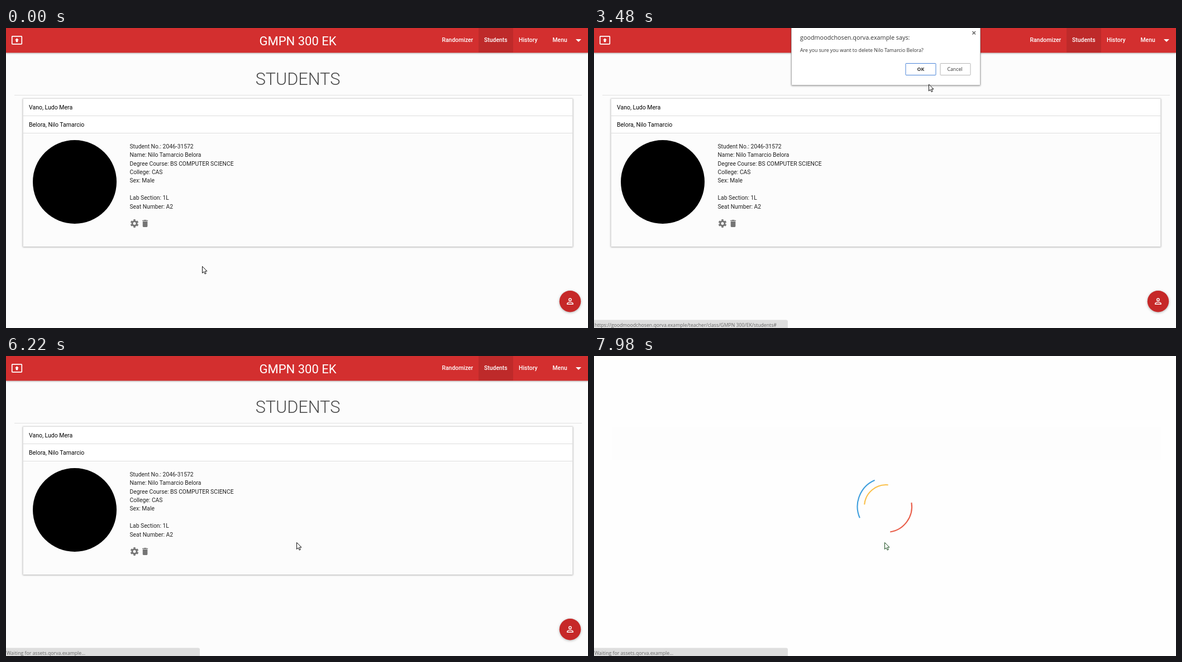
Write an HTML page that moves like this. It is 1042 by 538 pixels and loops after 8000 ms.

```html
<!DOCTYPE html>
<html lang="en">
<head>
<meta charset="utf-8">
<title>Students</title>
<style>
  html, body { margin: 0; width: 100%; height: 100%; overflow: hidden; background: #fcfcfc; }
  svg { display: block; }
  text { font-family: Roboto, sans-serif; white-space: pre; }
  .mid { text-anchor: middle; }
  .nav text { font-size: 10.4px; font-weight: 500; fill: #fff; }
  .row { font-size: 10.5px; fill: #000; }
  #info text { font-size: 10.32px; fill: #222; }
  .ui text { font-family: "Open Sans", sans-serif; font-size: 8.8px; fill: #333; }
  #card { filter: drop-shadow(0 1.2px 1.5px rgba(0,0,0,.32)); }
  #fab { filter: drop-shadow(0 1.5px 2px rgba(0,0,0,.3)); }
  #bar { filter: drop-shadow(0 1.2px 1.5px rgba(0,0,0,.3)); }
  #dialog { filter: drop-shadow(0 1px 1.5px rgba(0,0,0,.35)); transform-origin: 522.5px 51px; }
</style>
</head>
<body>
<svg width="1042" height="538" viewBox="0 0 1042 538">
  <g id="page">
    <rect width="1042" height="538" fill="#fcfcfc"/>
    <rect id="bar" width="1042" height="44.4" fill="#d32f2f"/>
    <g class="nav">
      <rect x="846" width="62" height="44" fill="#be2a2a"/>
      <path transform="translate(9 11.3) scale(.875)" fill="#fff" d="M21 3H3c-1.1 0-2 .9-2 2v14c0 1.1.9 2 2 2h18c1.1 0 2-.9 2-2V5c0-1.1-.9-2-2-2zm0 16H3V5h18zM10 12H8l4-4 4 4h-2v4h-4z"/>
      <text class="mid" x="522.5" y="31" style="font-size:22px;font-weight:400">GMPN 300 EK</text>
      <text x="780.5" y="25">Randomizer</text>
      <text x="856" y="25">Students</text>
      <text x="918" y="25">History</text>
      <text x="978.5" y="25">Menu</text>
      <path d="M1020 20h10l-5 5z" fill="#fff"/>
    </g>
    <text class="mid" x="522.5" y="101.5" font-size="30.66" font-weight="300" fill="#4a4a4a">STUDENTS</text>
    <path d="M15 120.5H1031" stroke="#e0e0e0"/>
    <g id="card">
      <rect x="30" y="126" width="985" height="266" fill="#fcfcfc"/>
      <path d="M30 126h985v62H30z" fill="#fff"/>
    </g>
    <path d="M30.5 392V126.5H1014.5V392M30 157.5H1015M30 188.5H1015" fill="none" stroke="#ddd"/>
    <text class="row" x="41" y="145.5">Vano, Ludo Mera</text>
    <text class="row" x="41" y="177">Belora, Nilo Tamarcio</text>
    <circle cx="123" cy="276" r="75"/>
    <g id="info"></g>
    <g fill="none" stroke="#757575">
      <circle cx="230" cy="350.5" r="4" stroke-width="3"/>
      <circle cx="230" cy="350.5" r="6.2" stroke-width="2.4" pathLength="360" stroke-dasharray="32 28" stroke-dashoffset="-14"/>
    </g>
    <path transform="translate(240.4 341.8) scale(.72)" fill="#757575" d="M6 19c0 1.1.9 2 2 2h8c1.1 0 2-.9 2-2V7H6zM19 4h-3.5l-1-1h-5l-1 1H5v2h14z"/>
    <circle id="fab" cx="1010" cy="490.2" r="19.2" fill="#c62828"/>
    <g transform="translate(1001.2 481.4) scale(.73)" fill="none" stroke="#fff" stroke-width="1.9">
      <circle cx="12" cy="8" r="3"/>
      <path d="M5 19v-2c0-1.5 4-3 7-3s7 1.5 7 3v2z"/>
    </g>
  </g>

  <g id="loader">
    <rect width="1042" height="538" fill="#fefefe"/>
    <rect x="32" y="127" width="983" height="60" fill="#fdfdfd"/>
    <g id="arcs" fill="none" stroke-width="2.1"></g>
  </g>

  <g id="status" class="ui">
    <path d="M0 523.5H344q3 0 3 3V538H0z" fill="#dedede"/>
    <text id="statusText" x="1" y="535.5" style="font-size:8.7px;fill:#666"></text>
  </g>

  <g id="dialog" class="ui">
    <rect x="353.5" y="-4.5" width="338" height="107" rx="1" fill="#fff" stroke="#b0b0b0"/>
    <text x="369" y="20.5" style="font-size:10.8px">goodmoodchosen.qorva.example says:</text>
    <text x="369" y="43">Are you sure you want to delete Nilo Tamarcio Belora?</text>
    <rect x="558" y="63.5" width="54" height="21" rx="1" fill="#fff" stroke="#4a84d8"/>
    <text class="mid" x="585" y="76.5" font-weight="700">OK</text>
    <rect x="620" y="63.5" width="54" height="21" rx="1" fill="#fff" stroke="#b5b5b5"/>
    <text class="mid" x="646" y="76.5">Cancel</text>
    <path d="M677.5 6l5.5 5.5m0-5.5l-5.5 5.5" stroke="#666" stroke-width="1.6"/>
  </g>

  <g id="cursor" stroke="#111" fill="#fff">
    <path id="arrow" d="M.5.5v12l2.8-2.6 1.9 4.2 2-.9-1.9-4.1h3.7z"/>
    <path id="hand" transform="translate(-4)" d="M4 11V1.8q0-1.3 1.2-1.3t1.2 1.3V7q2.2-.6 2.2.8 2-.3 2 1 2-.2 1.9 1.4v4l-1.5 3v1.5H5.2V17L.8 11.6q-.6-1.6 1-1.5z"/>
    <path id="beam" d="M0 4.5h5M2.5 4.5v13M0 17.5h5" stroke="#43a047"/>
  </g>
</svg>
<script>
const $ = id => document.getElementById(id);
const show = (id, on) => $(id).style.display = on ? '' : 'none';

const HOST = 'goodmoodchosen.qorva.example';
const URL_TEXT = `https://${HOST}/teacher/class/GMPN 300/EK/students#`;
const waitFor = host => `Waiting for ${host}...`;

$('info').innerHTML = [
  'Student No.: 2046-31572', 'Name: Nilo Tamarcio Belora',
  'Degree Course: BS COMPUTER SCIENCE', 'College: CAS', 'Sex: Male', '',
  'Lab Section: 1L', 'Seat Number: A2'
].map((line, i) => `<text x="221.5" y="${216 + i * 15.37}">${line}</text>`).join('');

// Quarter rings: colour, radius, degrees per ms
const rings = [['#3f9fdd', 51.4, .18], ['#e9604c', 46, .3], ['#fac04a', 39, .42]];
$('arcs').innerHTML = rings.map(([colour, r]) => {
  const d = r * Math.SQRT1_2;
  return `<path stroke="${colour}" d="M${-d} ${-d}A${r} ${r} 0 0 1 ${d} ${-d}"/>`;
}).join('');

// Status line: start time, text ('' hides it)
const statuses = [
  [0, ''], [1570, URL_TEXT], [4740, waitFor(HOST)], [4930, ''],
  [5500, waitFor(HOST)], [5670, waitFor('fonts.qorva.example')],
  [5980, 'Connecting...'], [6220, waitFor('assets.qorva.example')],
  [6990, 'Connecting...'], [7140, waitFor('assets.qorva.example')]
];

// Pointer moves: first step, last step, step count, target x, y
const moves = [
  [680, 980, 4, 290, 382], [1120, 1430, 4, 252, 357],
  [2990, 2990, 1, 370, 257], [3160, 3160, 1, 560, 151],
  [3480, 3480, 1, 599, 100.5], [3560, 3560, 1, 598, 100],
  [3850, 3920, 2, 588, 75], [4070, 4070, 1, 582, 70], [4140, 4140, 1, 588, 73],
  [5090, 5090, 1, 602, 219], [5290, 5360, 2, 531, 322], [5500, 5500, 1, 520, 334]
];

function pointer(t) {
  let x = 351, y = 427;
  for (const [from, to, steps, tx, ty] of moves) {
    if (t < from) break;
    const gap = (to - from) / (steps - 1);
    const done = t >= to ? 1 : (Math.floor((t - from) / gap) + 1) / steps;
    x += (tx - x) * done;
    y += (ty - y) * done;
  }
  return [x, y];
}

const hold = (t, from, gap) => from + Math.floor((t - from) / gap) * gap;
const spinTime = t =>
  t < 7080 ? hold(t, 6440, 91.42) : t < 7140 ? 7080 : t < 7250 ? 7140 : hold(t, 7250, 104.28);

function draw(now) {
  const t = now % 8000;
  const loading = t >= 6440;
  show('page', !loading);
  show('loader', loading);
  if (loading) {
    const age = spinTime(t) - 6360;
    rings.forEach(([, , speed], i) => $('arcs').children[i]
      .setAttribute('transform', `translate(523 270) rotate(${age * speed})`));
  }

  const label = statuses.findLast(([start]) => t >= start)[1];
  show('status', label);
  if ($('statusText').textContent !== label) $('statusText').textContent = label;

  const opening = t < 2360;
  show('dialog', t >= 2150 && t < 4290);
  $('dialog').style.opacity = opening ? .6 : 1;
  $('dialog').style.transform = opening ? 'scale(.96)' : 'none';

  const hand = t >= 1570 && t < 1990, beam = t >= 4930 && t < 5090;
  show('hand', hand);
  show('beam', beam);
  show('arrow', !hand && !beam);
  $('cursor').setAttribute('transform', `translate(${pointer(t)})`);
  $('cursor').setAttribute('stroke', loading ? '#1b4d20' : '#111');
  requestAnimationFrame(draw);
}
draw(performance.now());
</script>
</body>
</html>
```
